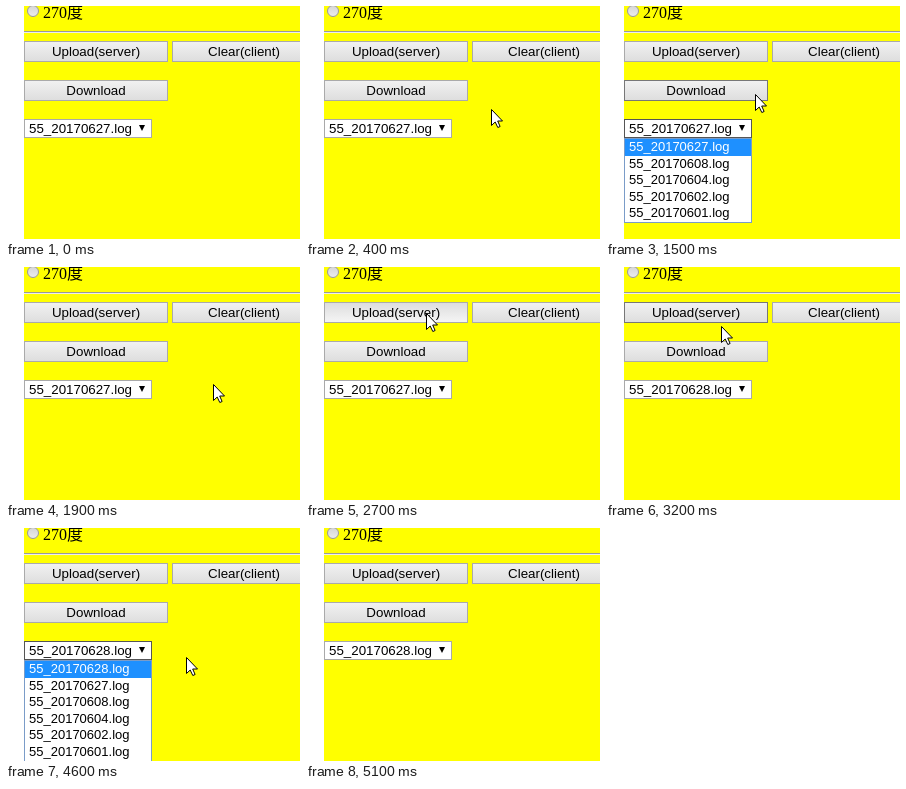
An HTML page with a canvas that plays this animation: 294x233 px, repeating every 5500 ms.

```html
<!DOCTYPE html>
<html lang="en">
<head>
<meta charset="utf-8">
<style>
  html, body { margin: 0; width: 100%; height: 100%; overflow: hidden; background: #fff; }
  canvas { display: block; }
</style>
</head>
<body>
<canvas id="stage" width="294" height="233"></canvas>
<script>
const ctx = document.getElementById('stage').getContext('2d');
const LOOP = 5500, STEP = 100;
const SHOWN = 200, HIDDEN = 5100, PRESS = 2700, UPLOADED = 2900;
const font = size => `${size}px "Liberation Sans", Arial, sans-serif`;
const SERIF = '16px "Liberation Serif", "Noto Sans CJK TC", "Noto Sans CJK JP", serif';
const ROW = 16.5;
const DATES = ['0628', '0627', '0608', '0604', '0602', '0601'];
const BUTTON = { w: 144, h: 21 };
const ENTRY = [300, 10];

// Each sweep bends from the last resting place towards `via` and ends at `to`.
const SWEEPS = [
  { start: 200, steps: 4, via: [250, 100], to: [128, 116] },
  { start: 1000, steps: 2, via: [128, 121], to: [128, 126] },
  { start: 1300, steps: 6, via: [130, 55], to: [207, 117] },
  { start: 2100, steps: 5, via: [175, 60], to: [120, 46] },
  { start: 3200, steps: 5, via: [104, 77], to: [119, 125] },
  { start: 4500, steps: 3, via: [165, 130], to: [211, 129] },
  { start: 5000, steps: 1, via: [235, 110], to: [259, 94] }
];

const within = (v, from, to) => v >= from && v < to;
const bend = (a, b, c, p) => (1 - p) ** 2 * a + 2 * p * (1 - p) * b + p * p * c;

function pointerAt(t) {
  if (!within(t, SHOWN, HIDDEN)) return null;
  let tip = ENTRY;
  for (const { start, steps, via, to } of SWEEPS) {
    if (t < start) break;
    const p = Math.min(1, (Math.floor((t - start) / STEP) + 1) / steps);
    tip = tip.map((from, axis) => Math.round(bend(from, via[axis], to[axis], p)));
  }
  return tip;
}

function rect(x, y, w, h, color) {
  ctx.fillStyle = color;
  ctx.fillRect(x, y, w, h);
}

function box(x, y, w, h, fill, border) {
  rect(x, y, w, h, fill);
  ctx.strokeStyle = border;
  ctx.lineWidth = 1;
  ctx.strokeRect(x + 0.5, y + 0.5, w - 1, h - 1);
}

function text(value, x, y, { color = '#000', align = 'left', face = font(13.333) } = {}) {
  ctx.font = face;
  ctx.textAlign = align;
  ctx.fillStyle = color;
  ctx.fillText(value, x, y);
}

function polygon(points, fill) {
  ctx.beginPath();
  points.forEach(([x, y]) => ctx.lineTo(x, y));
  ctx.closePath();
  ctx.fillStyle = fill;
  ctx.fill();
}

function fade(y, h, top, bottom) {
  const shade = ctx.createLinearGradient(0, y, 0, y + h);
  shade.addColorStop(0, top);
  shade.addColorStop(1, bottom);
  return shade;
}

function drawButton(label, x, y, tip, pressing = false) {
  const { w, h } = BUTTON;
  const hover = tip && within(tip[0], x, x + w) && within(tip[1], y, y + h);
  const fill = pressing ? fade(y, h, '#dcdcdc', '#f6f6f6') : fade(y, h, '#f2f2f2', '#dddddd');
  box(x, y, w, h, fill, hover && !pressing ? '#777' : '#aaa');
  text(label, x + w / 2, y + 15, { align: 'center' });
}

function drawRadio() {
  ctx.beginPath();
  ctx.arc(27, 5, 5.5, 0, Math.PI * 2);
  ctx.fillStyle = fade(-1, 12, '#d4d4d4', '#eeeeee');
  ctx.fill();
  ctx.strokeStyle = '#999';
  ctx.lineWidth = 1;
  ctx.stroke();
  text('270度', 37, 12, { face: SERIF });
}

const fileName = date => `55_2017${date}.log`;

function drawList(dates, paper) {
  box(18, 132, 128, Math.ceil(dates.length * ROW + 2.5), paper, '#7a9cc8');
  rect(19, 133, 126, 17, '#1e90ff');
  dates.forEach((date, i) => text(fileName(date), 23, 145 + Math.round(i * ROW),
    { color: i ? '#000' : '#fff', face: font(13) }));
}

function drawSelect(dates, open, paper) {
  box(18, 113, 128, 19, paper, open ? '#555' : '#a9a9a9');
  text(fileName(dates[0]), 23, 127);
  polygon([[133, 119], [139, 119], [136, 125]], '#000');
  if (open) drawList(dates, paper);
}

function drawPointer([x, y]) {
  const outline = [[0, 0], [0, 16], [3.7, 12.5], [6.3, 18], [8.6, 17], [6.2, 11.5], [11, 11.5]];
  polygon(outline.map(([dx, dy]) => [x + dx + 0.5, y + dy + 0.5]), '#fff');
  ctx.strokeStyle = '#000';
  ctx.lineWidth = 1;
  ctx.stroke();
}

function draw(t) {
  const tip = pointerAt(t);
  const hoverTip = pointerAt(t - STEP); // hover styling lags one step
  const open = within(t, 700, 1900) || within(t, 3800, 4800);
  const opening = within(t, 700, 800) || within(t, 3800, 3900);

  rect(0, 0, 294, 233, '#fff');
  rect(18, 0, 276, 233, '#ff0');
  drawRadio();
  rect(18, 25, 276, 1, '#9a9a9a');
  rect(18, 26, 276, 1, '#eee');

  drawButton('Upload(server)', 18, 35, hoverTip, within(t, PRESS, PRESS + STEP));
  drawButton('Clear(client)', 166, 35, hoverTip);
  drawButton('Download', 18, 74, hoverTip);
  drawSelect(DATES.slice(t < UPLOADED ? 1 : 0), open, opening ? '#fdf8ff' : '#fff');
  if (tip) drawPointer(tip);
}

function tick() {
  draw(performance.now() % LOOP);
  requestAnimationFrame(tick);
}
tick();
</script>
</body>
</html>
```
